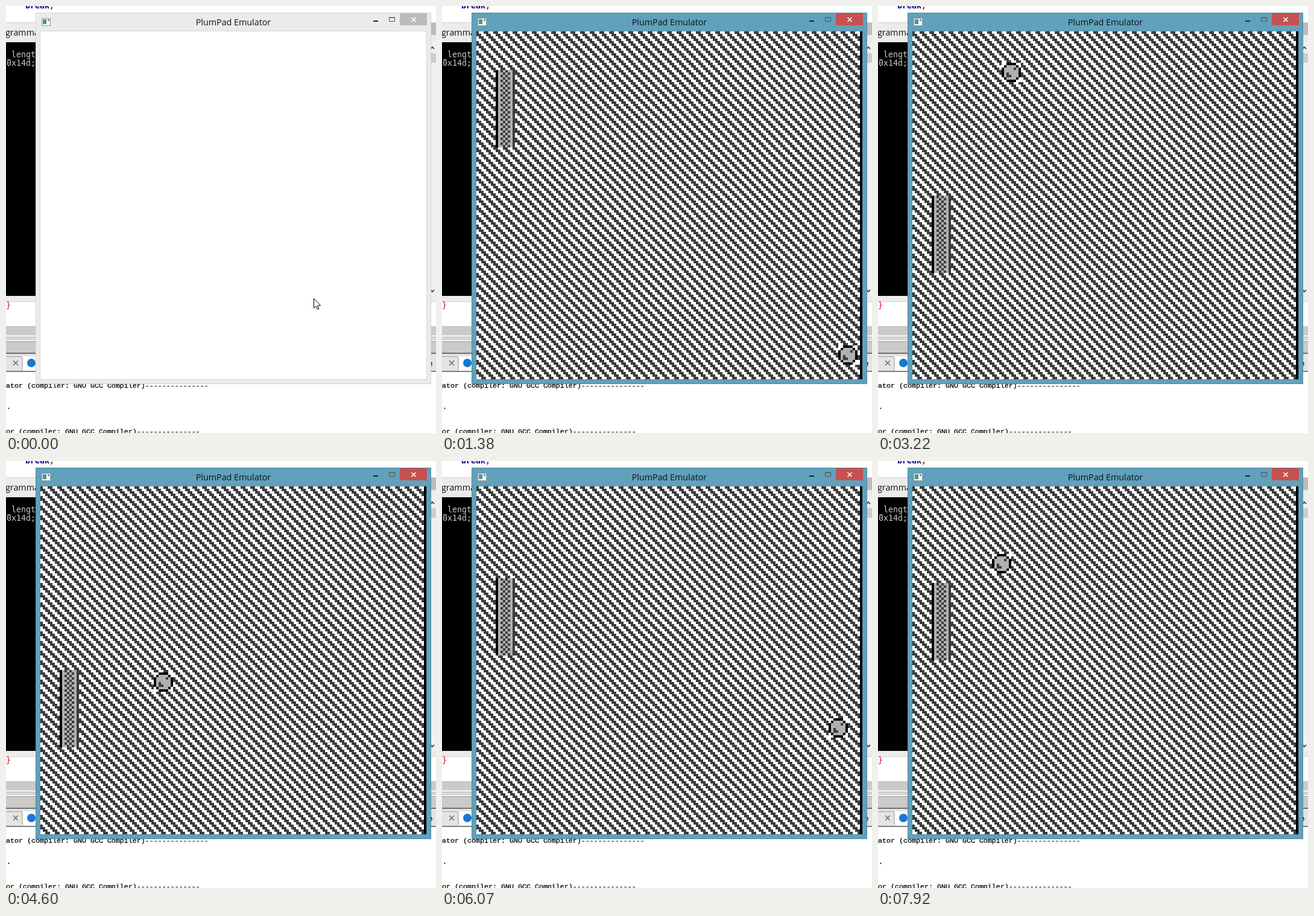
Recreate the animation shown at these times as an HTML page with a canvas. Size 713 by 707 pixels, loop 8000 ms.

```html
<!DOCTYPE html>
<html lang="en">
<head>
<meta charset="utf-8">
<title>Emulator window</title>
<style>
  html, body { margin: 0; width: 100%; height: 100%; overflow: hidden; background: #fff; }
  svg, canvas { position: absolute; display: block; }
  svg { left: 0; top: 0; }
  canvas { left: 57px; top: 42px; width: 640px; height: 576px; image-rendering: pixelated; }
  .ui { font: 14.3px "Open Sans", "Noto Sans", sans-serif; }
  .console { font: 13.3px "DejaVu Sans Mono", monospace; fill: #c8c8c8; }
  .code { font: bold 13.3px "DejaVu Sans Mono", monospace; }
  .log { font: 11.67px "Liberation Mono", monospace; stroke: #000; stroke-width: .25px; }
</style>
</head>
<body>
<svg width="713" height="707" viewBox="0 0 713 707">
  <!-- editor behind the window -->
  <rect width="713" height="707" fill="#fff"/>
  <text class="code" x="32" y="4" fill="#00008b">break<tspan fill="#e00000">;</tspan></text>
  <rect y="27" width="713" height="33" fill="#ebebeb"/>
  <rect y="27" width="713" height="1" fill="#d0d0d0"/>
  <text class="ui" x="-1" y="49" fill="#111">gramma</text>
  <rect x="704" y="28" width="9" height="20" fill="#bcbcbc"/>
  <rect y="60" width="50" height="420" fill="#000"/>
  <text class="console" x="-7" y="85">t_lengt</text>
  <text class="console" x="1" y="99">0x14d;</text>
  <rect x="704" y="60" width="9" height="420" fill="#f0f0f0"/>
  <rect x="704" y="78" width="9" height="16" fill="#cdcdcd"/>
  <path d="M704 71l3-3 3 3M704 470l3 3 3-3" fill="none" stroke="#505050" stroke-width="2"/>
  <rect y="480" width="713" height="9" fill="#ebebeb"/>
  <rect y="489" width="713" height="1" fill="#d0d0d0"/>
  <text x="0" y="500" class="code" style="font-weight:400" fill="#e00028">}</text>
  <rect y="530" width="713" height="15" fill="#cacaca"/>
  <rect y="545" width="713" height="60" fill="#f0f0f0"/>
  <path d="M0 548.5H713M0 551.5H713M0 555.5H713" stroke="#a0a0a0"/>
  <rect y="556" width="713" height="18" fill="#cacaca"/>
  <rect y="574" width="713" height="2" fill="#707070"/>
  <rect y="576" width="713" height="28" fill="#e4e4e4"/>
  <path d="M0 580.5H24q3 0 3 3V602" fill="none" stroke="#a0a0a0"/>
  <rect x="28" y="580" width="30" height="25" fill="#fff"/>
  <path d="M12 587l8 8m0-8l-8 8" stroke="#666" stroke-width="1.4"/>
  <circle cx="42" cy="591" r="7" fill="#1677d2"/>
  <text class="code" x="700" y="596" fill="#00008b" style="font-size:12px">e</text>
  <rect y="604" width="713" height="2" fill="#808080"/>
  <rect y="606" width="713" height="101" fill="#fff"/>
  <g class="log">
    <text x="0" y="632">ator (compiler: GNU GCC Compiler)---------------</text>
    <text x="1" y="667">.</text>
    <text x="0" y="708">or (compiler: GNU GCC Compiler)---------------</text>
  </g>

  <!-- emulator window: idle frame, then focused frame above it -->
  <rect x="49.5" y="11.5" width="655" height="614" fill="#ebebeb" stroke="#d5d5d5"/>
  <rect x="653" y="12" width="45" height="20" fill="#bcbcbc"/>
  <rect x="56" y="41" width="642" height="578" fill="#d5d5d5"/>
  <g id="focused">
    <rect x="49.5" y="11.5" width="655" height="614" fill="#61a1bb" stroke="#528ba3"/>
    <rect x="653" y="12" width="45" height="20" fill="#c75050"/>
    <rect x="56" y="41" width="642" height="578" fill="#5793ab"/>
  </g>
  <rect x="57" y="42" width="640" height="576" fill="#fff"/>
  <rect x="59.5" y="20.5" width="14" height="12" fill="#f8f8f8" stroke="#9a9a9a"/>
  <rect x="61" y="22" width="6" height="8" fill="#4f9488"/>
  <rect x="69" y="22" width="3" height="3" fill="#6f8fb0"/>
  <text class="ui" x="377" y="32" text-anchor="middle" fill="#111">PlumPad Emulator</text>
  <rect x="609" y="24" width="8" height="2" fill="#222"/>
  <path d="M635.5 19.5h9v6h-9zM635 19h10" fill="none" stroke="#555"/>
  <path d="M672.5 19l7 7m0-7l-7 7" stroke="#fff" stroke-width="1.6"/>
  <path id="cursor" d="M.5.5V16.2L4.2 12.8 6.7 18.4 8.9 17.4 6.5 12H11.5Z" fill="#fff" stroke="#000"/>
</svg>
<canvas id="screen" width="160" height="144"></canvas>
<script>
const LOOP = 8000, GAME_START = 900, TICK = 77.14;
const WHITE = '#fff', LIGHT = '#b0b0b0', DARK = '#3c3c3c', BLACK = '#000';

// Walls for the ball's top-left corner, in game pixels
const LEFT = -3, RIGHT = 152, TOP = -0.25, BOTTOM = 136;

// Paddle key presses: [first tick, pixels travelled]
const PADDLE_START = 16, PADDLE_SPEED = 10.2;
const presses = [[14.2, 18], [26.7, 60], [46.2, -24], [54, -58], [64.5, 50], [87, -22]];

const focused = document.getElementById('focused');
const cursor = document.getElementById('cursor');
const screen = document.getElementById('screen');
const ctx = screen.getContext('2d');

const clamp = (v, min, max) => Math.max(min, Math.min(max, v));

// Reflects a straight path between two walls
function bounce(pos, min, max) {
  const span = max - min;
  const phase = (((pos - min) % (2 * span)) + 2 * span) % (2 * span);
  return Math.round(min + span - Math.abs(span - phase));
}

// Ball path length: the emulator starts slow, then gains a little speed
function travelled(tick) {
  if (tick < 16) return 31 + 4.6 * (tick - 16);
  return 31 + 5.04 * (Math.min(tick, 48) - 16) + 5.2 * Math.max(0, tick - 48);
}

function paddleTop(tick) {
  const top = presses.reduce((y, [start, move]) => y + Math.sign(move) *
    clamp((tick - start) * PADDLE_SPEED, 0, Math.abs(move)), PADDLE_START);
  return 2 * Math.round(top / 2);
}

function fill(color, x, y, w = 1, h = 1) {
  ctx.fillStyle = color;
  ctx.fillRect(x, y, w, h);
}

function drawStripes() {
  fill(DARK, 0, 0, 160, 144);
  for (let y = 0; y < 144; y++)
    for (let x = (y + 1) % 4 - 4; x < 160; x += 4) fill(WHITE, x, y, 2);
  fill(BLACK, 159, 0, 1, 144);
}

function drawPaddle(top) {
  fill(LIGHT, 8, top, 8, 32);
  fill(BLACK, 8, top, 1, 32);
  fill(DARK, 15, top, 1, 32);
  for (let y = 0; y < 32; y++)
    for (let x = 10 + y % 2; x < 14; x += 2) fill(DARK, x, top + y);
}

function drawBall(x, y) {
  fill(WHITE, x, y, 8, 8);
  fill(BLACK, x + 2, y, 4, 8);
  fill(BLACK, x, y + 2, 8, 4);
  fill(BLACK, x + 1, y + 1, 6, 6);
  fill(LIGHT, x + 2, y + 1, 4, 6);
  fill(LIGHT, x + 1, y + 2, 6, 4);
  fill(DARK, x + 5, y + 2);
  fill(DARK, x + 2, y + 4, 1, 2);
  fill(DARK, x + 3, y + 5);
}

function drawGame(tick) {
  const path = travelled(tick);
  drawStripes();
  drawPaddle(paddleTop(tick));
  drawBall(bounce(139 - path, LEFT, RIGHT), bounce(115 - path, TOP, BOTTOM));
}

let lastTick = -1;
function render() {
  const t = performance.now() % LOOP;
  focused.style.opacity = t < 430 ? 0 : t < 500 ? 0.5 : 1;

  const step = clamp(Math.floor((t - 60) / 50), 0, 4);
  cursor.setAttribute('transform', `translate(${510 + Math.round(step * 5.5)} ${484 + step * 6})`);
  cursor.style.display = t < 430 ? '' : 'none';

  const running = t >= GAME_START;
  screen.style.display = running ? '' : 'none';
  const tick = Math.min(91, Math.floor((t - GAME_START + 20) / TICK));
  if (running && tick !== lastTick) drawGame(lastTick = tick);
  requestAnimationFrame(render);
}
render();
</script>
</body>
</html>
```
